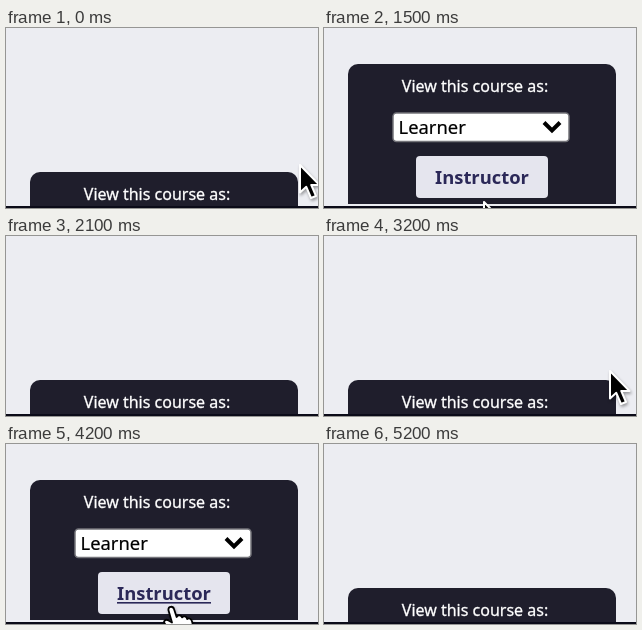
Animation of 312x180 px, one loop 5.6 s. Source, as an HTML page:

```html
<!DOCTYPE html>
<html lang="en">
<head>
<meta charset="utf-8">
<title>Course view switcher</title>
<style>
  html, body { margin: 0; width: 100%; height: 100%; overflow: hidden; background: #ecedf2; }
  svg { display: block; width: 312px; height: 180px; }
  text { font-family: "Noto Sans", "Open Sans", sans-serif; }
  .title { font-size: 16px; fill: #fff; stroke: #fff; stroke-width: .3; text-anchor: middle; }
  .choice { font-size: 18.4px; fill: #000; stroke: #000; stroke-width: .2; }
  .action { font-size: 18.4px; font-weight: 700; fill: #2b2858; text-anchor: middle; }
  .cursor { stroke-linejoin: round; filter: drop-shadow(1px 2px 1.5px rgba(0, 0, 0, .35)); }
</style>
</head>
<body>
<svg viewBox="0 0 312 180">
  <rect width="312" height="180" fill="#ecedf2"/>
  <g id="panel">
    <rect x="24" width="268" height="140" rx="10" fill="#1f1e2c"/>
    <rect x="24" y="120" width="268" height="20" fill="#1f1e2c"/>
    <text class="title" x="151" y="28">View this course as:</text>
    <rect x="69" y="49" width="176" height="28.5" rx="3.5" fill="#fff" stroke="#74747a" stroke-width="1.5"/>
    <text class="choice" x="74.5" y="70">Learner</text>
    <path d="M220 58.5 L228 66.5 L236 58.5" fill="none" stroke="#000" stroke-width="4"/>
    <rect x="92" y="92" width="132" height="42" rx="4" fill="#e5e5ee"/>
    <text class="action" x="158" y="120">Instructor</text>
    <rect id="underline" x="111" y="122" width="94" height="1.6" fill="#2b2858"/>
  </g>
  <rect y="178" width="312" height="2" fill="#0b0b18"/>
  <path id="arrow" class="cursor" fill="#000" stroke="#fff" stroke-width="2"
    d="M0 1 V28.5 L6.3 22.8 L11 34 L16 32 L11.3 21 H19.5 Z"/>
  <g id="hand" class="cursor" fill="#fff" stroke="#000" stroke-width="1.8">
    <path d="M-2.6 3 C-2.8 -1 2 -1.2 3 2 L5.6 10 C7 7.4 10.4 8 11 10.4
      C12.6 8.4 15.8 9.4 16.2 12 C18 10.6 20.4 11.8 21 14.4 L22.4 20
      C23 24 21.4 26 21.4 30 H6.5 C5.5 26 -1 21 -5.6 17.4
      C-8.6 14.6 -5.6 11.6 -2.4 13.4 L1 15.6 Z"/>
    <path fill="none" stroke-width="1.4" d="M8 18.5 L9.6 25.5 M12.3 18 L13.6 25.2 M16.5 17.5 L17.8 24.8"/>
  </g>
</svg>
<script>
  const LOOP = 5600, STEP = 100, SLIDE = 400, LEAVE = 300;
  const CLOSED = 144, OPEN = 36;

  // The pointer glides in, rests on the button and drops out; the panel follows it.
  const visits = [
    { start: 0, glide: 600, from: [294, 136], rest: [160, 153], open: 186, leave: 1300, close: 1668 },
    { start: 3200, glide: 500, from: [286, 134], rest: [165, 163], open: 3286, leave: 4400, close: 4802 }
  ];

  const [panel, underline, arrow, hand] =
    ["panel", "underline", "arrow", "hand"].map(id => document.getElementById(id));

  const clamp = x => Math.min(1, Math.max(0, x));
  const mix = (a, b, p) => a + (b - a) * p;
  const easeOut = x => 1 - (1 - x) ** 3;
  const bezier = (a, b, s) => 3 * a * s * (1 - s) ** 2 + 3 * b * s * s * (1 - s) + s ** 3;

  // CSS "ease": cubic-bezier(.25, .1, .25, 1), solved by bisection
  function ease(x) {
    let lo = 0, hi = 1;
    for (let i = 0; i < 24; i++) {
      const mid = (lo + hi) / 2;
      if (bezier(.25, .25, mid) < x) lo = mid; else hi = mid;
    }
    return bezier(.1, 1, lo);
  }

  const slide = (t, start) => ease(clamp((t - start) / SLIDE));

  const panelTop = t => visits.reduce((top, v) =>
    mix(mix(top, OPEN, slide(t, v.open)), CLOSED, slide(t, v.close)), CLOSED);

  function pointer(t) {
    const v = visits.find(v => t >= v.start && t < v.leave + LEAVE);
    if (!v) return null;
    const p = easeOut(clamp((t - v.start) / v.glide));
    const drop = 30 * clamp((t - v.leave) / LEAVE);
    return { x: mix(v.from[0], v.rest[0], p), y: mix(v.from[1], v.rest[1], p) + drop };
  }

  const show = (el, on) => { el.style.display = on ? "" : "none"; };
  const move = (el, x, y) =>
    el.setAttribute("transform", `translate(${Math.round(x)} ${Math.round(y)})`);

  function render(t) {
    const top = panelTop(t), tip = pointer(t);
    const over = !!tip && Math.abs(tip.x - 158) < 66 && Math.abs(tip.y - top - 113) < 21;
    move(panel, 0, top);
    show(underline, over);
    show(hand, over);
    show(arrow, tip && !over);
    if (tip) move(over ? hand : arrow, tip.x, tip.y);
  }

  function frame() {
    render(Math.floor(performance.now() % LOOP / STEP) * STEP);
    requestAnimationFrame(frame);
  }
  frame();
</script>
</body>
</html>
```
